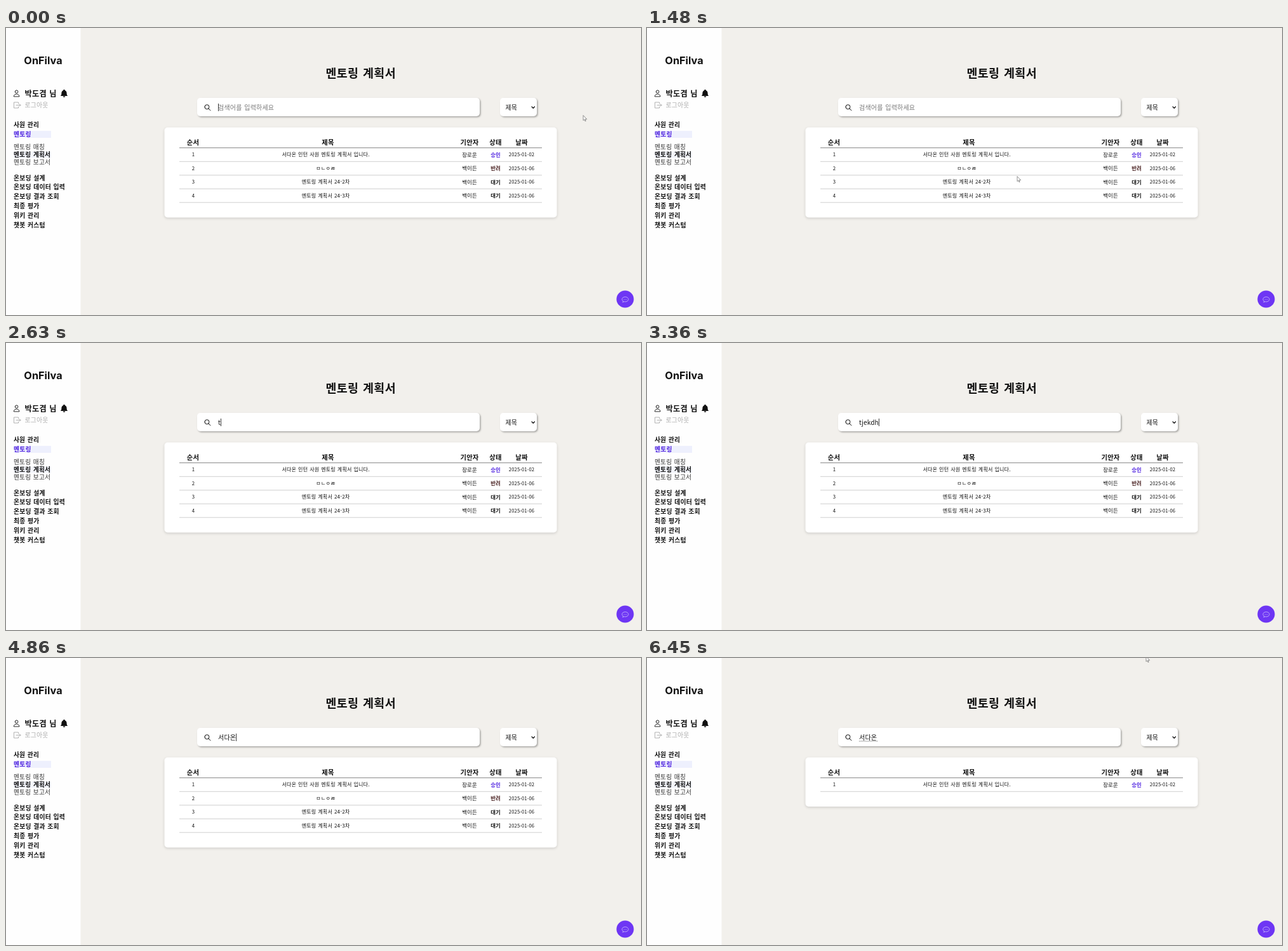
These frames come from a looping animation (1000 by 452 pixels, 6470 ms). An HTML page with a canvas:

```html
<!DOCTYPE html>
<html lang="ko">
<head>
<meta charset="utf-8">
<title>멘토링 계획서</title>
<style>
  html, body { margin: 0; width: 100%; height: 100%; overflow: hidden; background: #f2f0ec; }
  canvas { display: block; width: 1000px; height: 452px; }
</style>
</head>
<body>
<canvas id="stage"></canvas>
<script>
const LOOP = 6470;
const KO = '"Noto Sans CJK KR", "Noto Sans CJK", sans-serif';
const INK = '#111', PURPLE = '#4f22e0';
const canvas = document.getElementById('stage');
const ctx = canvas.getContext('2d');
const dpr = window.devicePixelRatio || 1;
canvas.width = 1000 * dpr;
canvas.height = 452 * dpr;

const LATIN_KEYS = 'tjekdhs';
const COMPOSED = ['ㅅ', '서', '섣', '서다', '서당', '서다오', '서다온'];
const ROWS = [
  ['1', '서다온 인턴 사원 멘토링 계획서 입니다.', '장로운', '승인', '2025-01-02'],
  ['2', 'ㅁㄴㅇㄻ', '백이든', '반려', '2025-01-06'],
  ['3', '멘토링 계획서 24-2차', '백이든', '대기', '2025-01-06'],
  ['4', '멘토링 계획서 24-3차', '백이든', '대기', '2025-01-06']
];
const STATUS = { 승인: PURPLE, 반려: '#4a2222', 대기: INK };
const FILTERED = 5300;

// Pointer tip: time, x, y
const PATH = [
  [0, 909, 138], [310, 909, 138], [380, 907, 136], [530, 905, 135], [640, 905, 135],
  [1170, 606, 243], [1280, 590, 240], [1430, 583, 234], [1500, 583, 234],
  [1870, 432, 128], [2090, 432, 128], [2410, 424, 125], [5860, 424, 125],
  [6010, 786, -2], [LOOP, 786, -2]
];

// y is the optical centre of the line
function label(str, x, y, size, { weight = 400, color = INK, align = 'left', family = KO } = {}) {
  ctx.font = `${weight} ${size}px ${family}`;
  ctx.letterSpacing = family === KO ? `${size * 0.02}px` : '0px';
  ctx.wordSpacing = `${size * 0.12}px`;
  ctx.textAlign = align;
  ctx.fillStyle = color;
  ctx.fillText(str, x, y + size * 0.37);
  return ctx.measureText(str).width;
}

function rect(x, y, w, h, color) {
  ctx.fillStyle = color;
  ctx.fillRect(x, y, w, h);
}

function panel(x, y, w, h, r, dx, dy, blur, shade) {
  ctx.save();
  ctx.shadowColor = shade;
  ctx.shadowOffsetX = dx * dpr;
  ctx.shadowOffsetY = dy * dpr;
  ctx.shadowBlur = blur * dpr;
  ctx.fillStyle = '#fff';
  ctx.beginPath();
  ctx.roundRect(x, y, w, h, r);
  ctx.fill();
  ctx.restore();
}

function stroke(path, color, width = 1) {
  ctx.strokeStyle = color;
  ctx.lineWidth = width;
  ctx.lineJoin = ctx.lineCap = 'round';
  ctx.stroke(new Path2D(path));
}

function fill(path, color) {
  ctx.fillStyle = color;
  ctx.fill(new Path2D(path));
}

function sidebar() {
  rect(0, 0, 117.5, 452, '#fefefe');
  label('OnFilva', 58.5, 50.5, 16.3, { weight: 700, align: 'center', family: 'Inter, sans-serif' });

  stroke('M14.3 100.3a2.300 2.300 0 1 0 4.600 0a2.300 2.300 0 1 0-4.600 0M12.200 107.600c0-4.800 8.800-4.800 8.800 0z', INK, 0.9);
  label('박도겸 님', 29.5, 103, 12.2, { weight: 700 });
  fill('M91.5 97c1 0 1.3.6 1.3 1.2c2 .7 2.8 2.4 2.8 4.6c0 2.4.7 3.2 1.6 4.2H85.8c.9-1 1.6-1.8 1.6-4.2c0-2.2.8-3.9 2.8-4.6c0-.6.3-1.2 1.3-1.2zM89.8 107.6h3.4c0 2-3.4 2-3.4 0z', INK);

  stroke('M19.5 119v-2H12.5v9H19.5v-2M16 121.5H23M21 119.5l2 2l-2 2', '#aaa', 0.9);
  label('로그아웃', 29.5, 121.3, 9.9, { color: '#aaa' });

  const bold = { weight: 700 };
  const sub = { color: '#333' };
  label('사원 관리', 12, 152, 9.7, bold);
  rect(12, 162, 59, 11, '#eef0fd');
  label('멘토링', 12, 167.3, 9.8, { weight: 700, color: PURPLE });
  label('멘토링 매칭', 12, 187.5, 9.7, sub);
  rect(12, 194.5, 59, 10, '#f3f5fc');
  label('멘토링 계획서', 12, 199.3, 9.7, bold);
  label('멘토링 보고서', 12, 211, 9.7, sub);

  ['온보딩 설계', '온보딩 데이터 입력', '온보딩 결과 조회', '최종 평가', '위키 관리', '챗봇 커스텀']
    .forEach((item, i) => label(item, 12, 235.9 + i * 14.88, 9.8, bold));
}

function table(filtered) {
  const rows = filtered ? ROWS.slice(0, 1) : ROWS;
  panel(249.5, 156.5, 618, filtered ? 77.5 : 142, 5, 0, 1.5, 4, 'rgba(0,0,0,.15)');

  const head = { weight: 700, align: 'center' };
  [['순서', 294.5], ['제목', 507], ['기안자', 730], ['상태', 771], ['날짜', 812]]
    .forEach(([name, x]) => label(name, x, 180, 10.3, head));
  rect(273, 188.2, 571, 1, '#858585');

  const mid = { align: 'center' };
  rows.forEach(([no, title, author, state, date], i) => {
    const y = 199.5 + i * 21.5;
    label(no, 295, y, 7.8, mid);
    label(title, 503.5, y, 8.05, mid);
    label(author, 730, y, 8.4, mid);
    label(state, 771, y, 8.4, { weight: 700, color: STATUS[state], align: 'center' });
    label(date, 812, y, 7.55, mid);
    rect(273, y + 10.3, 571, 1, '#cfcfcf');
  });
}

function typed(t) {
  if (t < 2630) return '';
  if (t < 3360) return LATIN_KEYS.slice(0, 1 + Math.floor((t - 2630) / 90));
  if (t < 3860) return LATIN_KEYS.slice(0, 6);
  if (t < 4160) return LATIN_KEYS.slice(0, Math.max(0, 5 - Math.floor((t - 3860) / 30)));
  return COMPOSED[Math.min(6, Math.floor((t - 4160) / 74))];
}

function caretOn(t) {
  const spans = [[0, 40], [2090, 2620], [2630, 3710], [3860, 5390], [5920, 6450]];
  return spans.some(([a, b]) => t >= a && t < b);
}

function searchBar(t) {
  const shade = 'rgba(0,0,0,.32)';
  panel(301, 110, 445, 29, 5, 1.5, 1.5, 2.5, shade);
  panel(778, 110, 58, 29, 5, 1.5, 1.5, 2.5, shade);
  stroke('M312.9 124.3a3.5 3.5 0 1 0 7 0a3.5 3.5 0 1 0-7 0M319 126.900l3 3', INK, 1);
  label('제목', 786.5, 125, 9.9);
  stroke('M828 124l2.2 2.2l2.2-2.2', INK, 1.3);

  const str = typed(t);
  let width = 0;
  if (str) width = label(str, 334, 125, 10);
  else label('검색어를 입력하세요', 334, 125, 10, { color: '#777' });

  if (t >= 4160 && t < 4860) {
    const before = ctx.measureText(str.slice(0, -1)).width;
    rect(334 + before, 130.5, width - before, 0.8, '#333');
  }
  if (t >= 5610) {
    for (let x = 334; x < 334 + width; x += 2) rect(x, 130.5, 1, 1, '#555');
  }
  if (caretOn(t)) rect(334 + width, 119, 0.9, 12, '#222');
}

function chatButton() {
  ctx.fillStyle = '#6e36f4';
  ctx.beginPath();
  ctx.arc(975, 427, 13.6, 0, Math.PI * 2);
  ctx.fill();
  stroke('M972 430.3c-2.6-1.5-2.6-4.6 0-6c2-1 4.5-1 6.2 0c2.6 1.5 2.6 4.5 0 6c-1.5.9-3 .9-4.4.6l-2.6.8z', '#cfc0fb', 0.8);
  [972.7, 974.7, 976.7].forEach(x => rect(x, 427, 0.8, 0.8, '#cfc0fb'));
}

function pointer(t) {
  if (t >= 2630 && t < 5860) return;
  const i = Math.max(1, PATH.findIndex(p => p[0] > t));
  const [t0, x0, y0] = PATH[i - 1], [t1, x1, y1] = PATH[i];
  const u = (t - t0) / (t1 - t0);
  const k = u * u * (3 - 2 * u);
  const x = x0 + (x1 - x0) * k, y = y0 + (y1 - y0) * k;

  ctx.save();
  ctx.translate(x, y);
  if (x > 301 && x < 746 && y > 110 && y < 139) {
    stroke('M-1.5-4.5H1.5M0-4.5V4.5M-1.5 4.5H1.5', '#444', 0.8);
  } else {
    const arrow = 'M0 0V7.6L1.8 6L3 8.8L4.2 8.3L3 5.6H5.3Z';
    fill(arrow, '#fff');
    stroke(arrow, '#777', 0.8);
  }
  ctx.restore();
}

function draw(now) {
  const t = now % LOOP;
  ctx.setTransform(dpr, 0, 0, dpr, 0, 0);
  rect(0, 0, 1000, 452, '#f2f0ec');
  sidebar();
  label('멘토링 계획서', 558.7, 71.5, 18.4, { weight: 700, align: 'center' });
  searchBar(t);
  table(t >= FILTERED);
  chatButton();
  pointer(t);
}

const start = performance.now();
function tick() {
  draw(performance.now() - start);
  requestAnimationFrame(tick);
}
tick();
</script>
</body>
</html>
```
